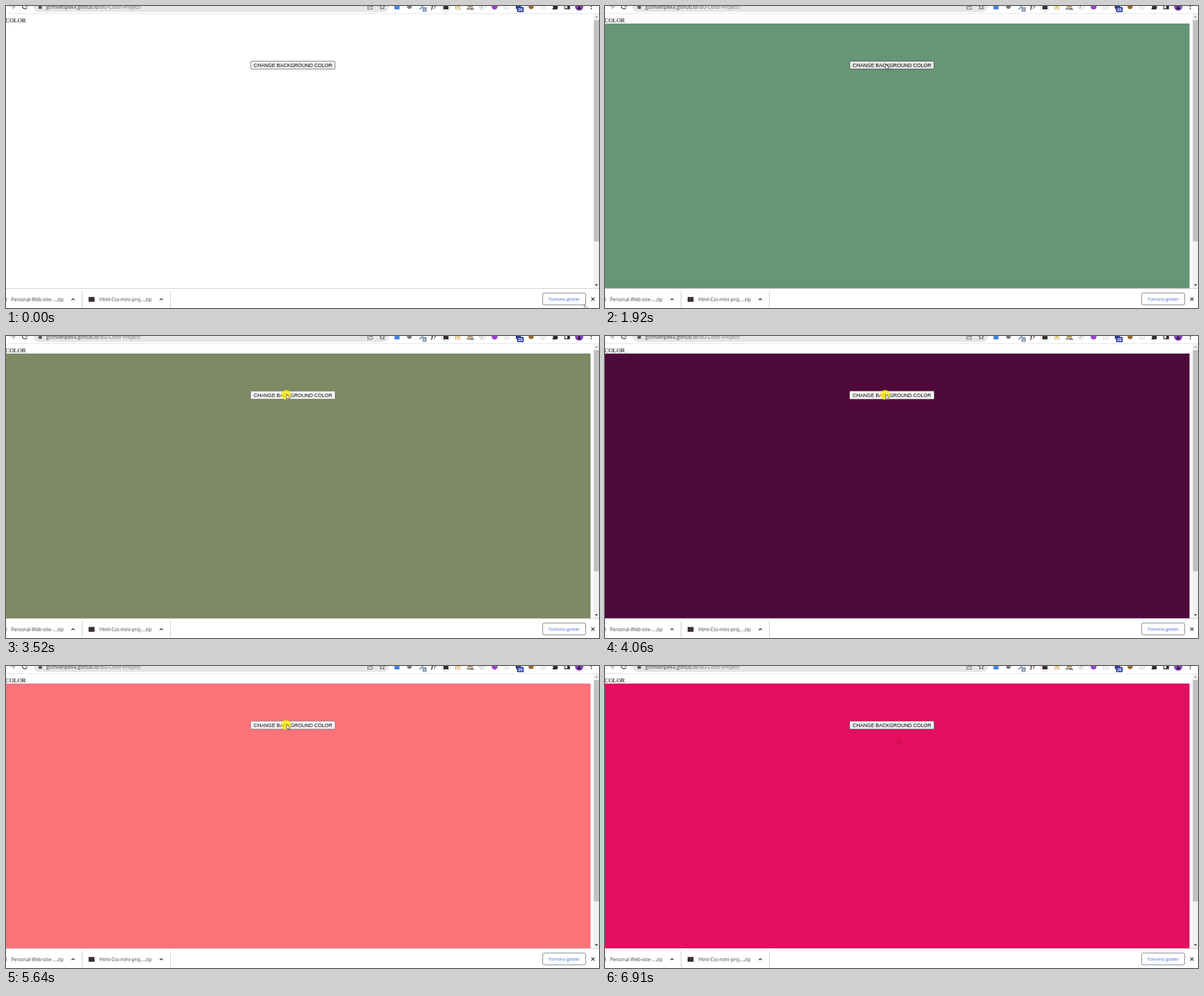
An HTML page for the animation above (7300 ms loop, 1048 by 534 pixels).

```html
<!DOCTYPE html>
<html lang="en">
<head>
<meta charset="utf-8">
<title>Background color changer</title>
<style>
  html, body { margin: 0; width: 100%; height: 100%; overflow: hidden; background: #fff; }
  svg { display: block; }
  .ui { font-family: "Open Sans", "Noto Sans", sans-serif; font-size: 8.33px; fill: #3c4043; }
  .url { font-size: 8.88px; }
  .page { font-family: "Liberation Serif", serif; font-size: 10.7px; }
  .label { font-family: "Liberation Sans", Arial, sans-serif; font-size: 8.93px; }
  .line { fill: none; stroke: #5f6368; stroke-width: 1.1; }
  .dark { stroke: #333; stroke-width: 1.4; }
</style>
</head>
<body>
<svg width="1048" height="534" viewBox="0 0 1048 534">
  <defs>
    <path id="arrow" d="M0 0V9.2L2.2 7.2L3.7 10.6L5 10L3.6 6.8H6.3Z"/>
    <path id="caret" d="M-2.7 1.4L0 -1.3L2.7 1.4"/>
  </defs>
  <rect width="1048" height="534" fill="#fff"/>

  <!-- browser toolbar -->
  <g>
    <path class="line" stroke-opacity=".7" d="M8 1H16M12 5L16 1"/>
    <path class="line dark" d="M29.5 -1A4.3 4.3 0 1 0 37.4 2.5M37.5 -2V0H34"/>
    <rect x="48" y="-12" width="629" height="22.5" rx="11" fill="#e4e5e7"/>
    <rect x="57.5" y="-1" width="6" height="6" rx=".7" fill="#55585c"/>
    <text class="ui url" x="71" y="5">gomvenpek4.github.io<tspan fill="#70757a">/BG-Color-Project/</tspan></text>
    <path class="line" d="M639.5 -1V5.5H647.5V3M641.5 3Q642 0 647.5 0M645.5 -2L648 0L645.5 2"/>
    <path class="line" d="M660.5 0H663.5L665 -3L666.5 0H669.5L667.2 2.2L668 5.5L665 3.8L662 5.5L662.8 2.2Z"/>
    <path d="M0 13.5H1048" stroke="#dfe1e3"/>
  </g>

  <!-- extension buttons -->
  <g>
    <rect x="686.5" y="-4" width="9" height="10" rx="1" fill="#4384e8"/>
    <circle cx="713" cy="1" r="4" fill="#77797c"/>
    <path d="M731 6L738 -1" stroke="#6e94b4" stroke-width="2.2"/>
    <rect x="736" y="2" width="7.5" height="8.5" rx="1.5" fill="#8c9bae"/>
    <text x="738" y="8.7" font-family="Open Sans, sans-serif" font-size="6" fill="#fff">0</text>
    <text x="751.5" y="5" font-family="Liberation Serif, serif" font-style="italic" font-weight="700" font-size="11" fill="#222">f?</text>
    <circle cx="777.5" cy="1.5" r="8" fill="#f8f8f8" stroke="#d3d3d3"/>
    <rect x="773" y="-2" width="9" height="8" rx="1" fill="#3a302b"/>
    <rect x="794.5" y="-3" width="8.5" height="8.5" fill="#fff4df" stroke="#c5a878"/>
    <rect x="796.5" y="0" width="4" height="3" fill="#edb657"/>
    <rect x="816" y="-3" width="9" height="5" fill="#b68a35"/>
    <text x="814.5" y="6.5" font-family="Open Sans, sans-serif" font-weight="700" font-size="4.5" fill="#222">HTML</text>
    <circle cx="841.5" cy="1" r="5" fill="#fff" stroke="#b9babc"/>
    <path d="M839 3.5L844 -1.5" stroke="#999" stroke-width="1.3"/>
    <circle cx="863.5" cy="1" r="5.2" fill="#9b3fd1"/>
    <rect x="880" y="-3" width="9.5" height="8.5" rx="1" fill="#f1f1f1" stroke="#dedede"/>
    <rect x="901" y="-2" width="9" height="7" fill="#29357f"/>
    <rect x="903" y="1.5" width="12" height="9.5" rx="2" fill="#3446a5"/>
    <text x="905" y="9" font-family="Open Sans, sans-serif" font-weight="700" font-size="7" fill="#fff">20</text>
    <circle cx="928" cy="1" r="4.6" fill="#956828"/>
    <circle cx="949" cy="1" r="4.8" fill="#f1f1f1" stroke="#d6d6d6"/>
    <path d="M966 -2H969A1.6 1.6 0 0 1 972 -2H974.5V1A1.6 1.6 0 0 1 974.5 4V6H966V3.7A1.6 1.6 0 0 0 966 .6Z" fill="#2b2c2e"/>
    <path d="M987.5 -3H996V5H987.5Z" fill="none" stroke="#2b2c2e" stroke-width="1.4"/>
    <rect x="992" y="-3" width="4" height="8" fill="#2b2c2e"/>
    <circle cx="1013" cy="1" r="7.3" fill="#8a45c0"/>
    <path d="M1009.5 6Q1009.5 2 1013 2T1016.5 6ZM1011 0A2 2 0 1 1 1015 0A2 2 0 1 1 1011 0" fill="#30213d"/>
    <g fill="#333"><circle cx="1034.5" cy="1" r="1.1"/><circle cx="1034.5" cy="4.7" r="1.1"/></g>
  </g>

  <!-- page -->
  <text class="page" x="-1" y="29">COLOR</text>
  <rect id="panel" x="0" y="31" width="1033" height="469"/>
  <rect id="button" x="432.5" y="97.5" width="149" height="14" rx="1.5"/>
  <text class="label" x="437.7" y="108">CHANGE BACKGROUND COLOR</text>

  <!-- scrollbar -->
  <rect x="1038" y="14" width="10" height="486" fill="#f1f1f1"/>
  <rect x="1039" y="25" width="9" height="391" fill="#c1c1c1"/>
  <path d="M1040.5 20.5L1043.5 17.5L1046.5 20.5Z" fill="#a3a3a3"/>
  <path d="M1040.5 492L1043.5 495L1046.5 492Z" fill="#444"/>

  <!-- download shelf -->
  <rect y="499" width="1048" height="35" fill="#fff"/>
  <path d="M0 499.5H1048M134.5 504V533M290.5 504V533" stroke="#c6c8ca"/>
  <path d="M.5 515V522" stroke="#777"/>
  <text class="ui" x="9" y="522">Personal-Web-site-....zip</text>
  <rect x="146" y="514.5" width="10.5" height="8.5" fill="#3d3038"/>
  <text class="ui" x="165" y="522">Html-Css-mini-proj....zip</text>
  <use href="#caret" x="118.5" y="518.5" class="line dark"/>
  <use href="#caret" x="274.5" y="518.5" class="line dark"/>
  <rect x="948.5" y="507.5" width="76" height="21" rx="2.5" fill="#fff" stroke="#747b86"/>
  <text class="ui" x="958.5" y="521" style="font-size:7.85px;font-weight:500;fill:#2f62c9">Tümünü göster</text>
  <path class="line dark" d="M1034.5 515.5L1040 521M1040 515.5L1034.5 521"/>

  <!-- pointer -->
  <use id="trace" href="#arrow" x="517" y="128.5" fill="#b8173f" opacity=".75"/>
  <circle id="halo" cx="495" cy="104" r="8.7" fill="#ffee00" opacity=".72"/>
  <use id="pointer" href="#arrow" fill="#fff" stroke="#333" stroke-width=".8"/>
</svg>
<script>
  const LOOP = 7300;
  const HOME = [496, 103];
  const ENTRY = { start: 380, end: 900, steps: 9 };
  const EXIT = { start: 6180, end: 6910, steps: 11 };
  // press time, release time, color after release
  const CLICKS = [
    [1100, 1230, "#8f7a9c"], [1830, 1920, "#669673"],
    [2360, 2520, "#3699ff"], [2980, 3070, "#7d8a64"],
    [3520, 3660, "#4f0a3c"], [4060, 4130, "#8c7f70"],
    [4520, 4590, "#3cd7c7"], [4930, 4990, "#7b84a8"],
    [5320, 5380, "#f97379"], [5640, 5710, "#9a7a86"],
    [5990, 6040, "#e20e60"]
  ];
  const BUTTON = {
    rest: ["#efefef", "#767676"],
    hover: ["#e5e5e5", "#4f4f4f"],
    active: ["#f5f5f5", "#8d8d8d"]
  };
  const [panel, button, trace, halo, pointer] =
    ["panel", "button", "trace", "halo", "pointer"].map(id => document.getElementById(id));

  const smooth = p => p * p * (3 - 2 * p);
  const mix = (a, b, p) => a + (b - a) * p;
  const show = (el, on) => el.setAttribute("visibility", on ? "visible" : "hidden");
  const stepAt = (t, { start, end, steps }) =>
    t < start ? 0 : Math.min(steps, 1 + Math.floor((t - start) / (end - start) * (steps - 1) + 1e-6));

  function pointerAt(t) {
    if (t < EXIT.start) {
      const p = smooth(stepAt(t, ENTRY) / ENTRY.steps);
      return [mix(1022, HOME[0], p), mix(528, HOME[1], p)];
    }
    const p = smooth(Math.min(1, stepAt(t, EXIT) / (EXIT.steps - 1)));
    return [mix(HOME[0], 1019, p ** 1.15), mix(HOME[1], 520, p)];
  }

  function render(t) {
    const [x, y] = pointerAt(t);
    const pressed = CLICKS.some(([down, up]) => t >= down && t < up);
    const last = CLICKS.filter(([, up]) => t >= up).pop();
    const over = x > 432 && x < 582 && y > 97 && y < 112;
    const [fill, stroke] = BUTTON[pressed ? "active" : over ? "hover" : "rest"];
    panel.setAttribute("fill", last ? last[2] : "#fff");
    button.setAttribute("fill", fill);
    button.setAttribute("stroke", stroke);
    pointer.setAttribute("transform", `translate(${x} ${y})`);
    show(pointer, t < EXIT.end);
    show(halo, pressed);
    show(trace, stepAt(t, EXIT) > 2);
  }

  const origin = performance.now();
  function tick() {
    render((performance.now() - origin) % LOOP);
    requestAnimationFrame(tick);
  }
  tick();
</script>
</body>
</html>
```
